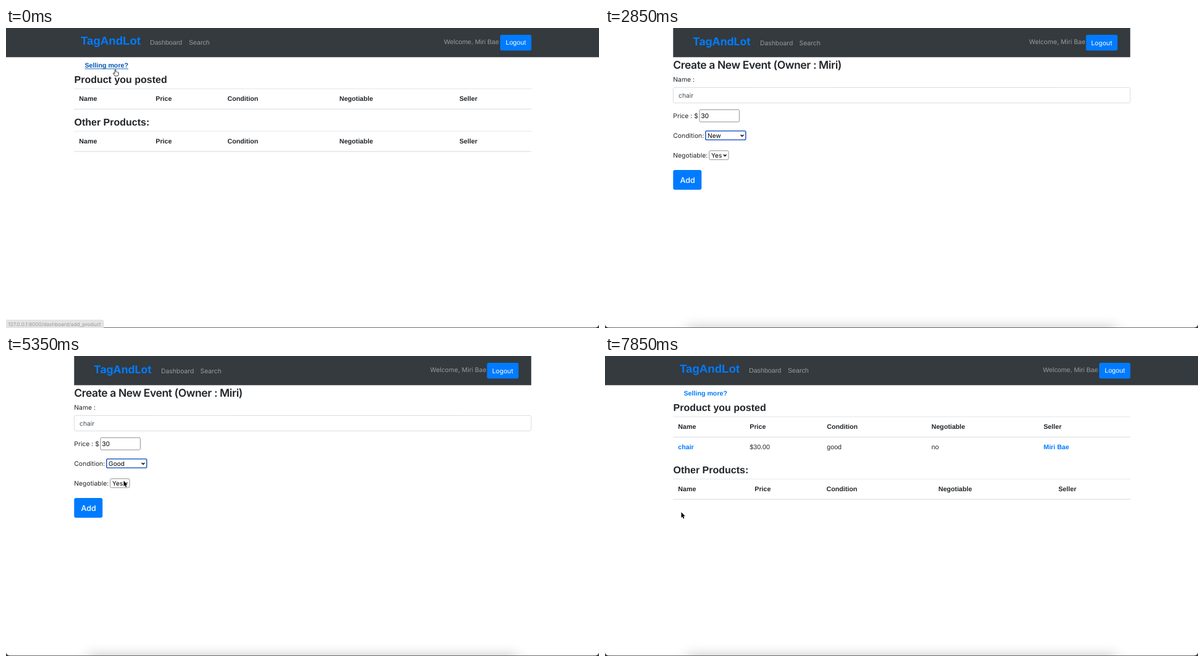
An HTML page with a canvas for the animation above (8 s loop, 960 by 486 pixels).

```html
<!DOCTYPE html>
<html lang="en">
<head>
<meta charset="utf-8">
<title>Marketplace demo</title>
<style>
  html, body { margin: 0; height: 100%; overflow: hidden; background: #fff; }
  canvas { display: block; }
</style>
</head>
<body>
<canvas id="stage" width="960" height="486"></canvas>
<script>
const ctx = document.getElementById('stage').getContext('2d');
const LOOP = 8000;
const HELV = '"Liberation Sans", Arial, sans-serif';
const INTER = 'Inter, sans-serif';
const BRAND = 'TagAndLot', FIRST = 'Miri', FULL = 'Miri Bae';
const BLUE = '#007bff', INK = '#212529', MUTED = '#999c9f', DARK = '#343a3e';
const ROWS = ['Test', 'Chair', 'Test2', 'chair', 'test3', 'test4'];

// time, x, y of the pointer's hot spot
const PATH = [
  [50, 177, 67], [500, 191.5, 110.5], [3450, 191.5, 110.5], [3800, 209, 174],
  [4250, 210, 176], [4400, 213.6, 198], [4600, 214, 201], [4900, 208, 209],
  [5100, 207, 210], [5350, 190.5, 202], [5800, 190.5, 203], [6050, 187.3, 222.5],
  [6400, 187.3, 222.5], [6900, 130, 250], [7350, 130, 250], [7550, 123.5, 253],
];

const ramp = (t, from, to) => Math.min(1, Math.max(0, (t - from) / (to - from)));

function pointerAt(t) {
  let i = 1;
  while (i < PATH.length - 1 && t > PATH[i][0]) i++;
  const [t0, x0, y0] = PATH[i - 1], [t1, x1, y1] = PATH[i];
  const k = ramp(t, t0, t1), e = k * k * (3 - 2 * k);
  return [x0 + (x1 - x0) * e, y0 + (y1 - y0) * e];
}

function text(str, x, y, size, { family = INTER, weight = 400, color = INK, spacing = 0 } = {}) {
  ctx.font = `${weight} ${size}px ${family}`;
  ctx.letterSpacing = spacing + 'px';
  ctx.fillStyle = color;
  ctx.fillText(str, x, y);
}

function rect(x, y, w, h, color) {
  ctx.fillStyle = color;
  ctx.fillRect(x, y, w, h);
}

function box(x, y, w, h, radius, fill, stroke, line = 1) {
  ctx.beginPath();
  ctx.roundRect(x, y, w, h, radius);
  if (fill) { ctx.fillStyle = fill; ctx.fill(); }
  if (stroke) { ctx.strokeStyle = stroke; ctx.lineWidth = line; ctx.stroke(); }
}

function withShadow(color, blur, dy, draw) {
  ctx.save();
  Object.assign(ctx, { shadowColor: color, shadowBlur: blur, shadowOffsetY: dy });
  draw();
  ctx.restore();
}

function polyline(points, color, width) {
  ctx.beginPath();
  points.forEach(([x, y]) => ctx.lineTo(x, y));
  ctx.strokeStyle = color;
  ctx.lineWidth = width;
  ctx.stroke();
}

function windowFrame(dockShadow) {
  rect(0, 0, 960, 486, '#3a3a3c');
  box(0, -10, 960, 495.2, 6, '#fff');
  if (!dockShadow) return;
  ctx.save();
  ctx.clip();
  withShadow('rgba(0,0,0,.28)', 22, 0, () => rect(132, 487, 696, 20, '#000'));
  ctx.restore();
}

function tableHead(y, columns) {
  rect(110, y, 740.5, 0.8, '#dee2e6');
  rect(110, y + 32.6, 740.5, 1.3, '#dee2e6');
  ['Name', 'Price', 'Condition', 'Negotiable', 'Seller'].forEach((label, i) =>
    text(label, columns[i], y + 20, 10.67, { family: HELV, weight: 700 }));
}

function dashboard(t) {
  const posted = t > 4000;
  const say = (str, x, y, color, weight, size = 10.67) =>
    text(str, x, y, size, { family: HELV, weight, color });
  windowFrame(posted);
  rect(0, 0, 960, 47.3, DARK);
  say(BRAND, 121, 27, BLUE, 700, 18.67);
  say('Dashboard', 233, 27, MUTED);
  say('Search', 296, 27, MUTED);
  say('Welcome, ' + FULL, 709, 26.3, MUTED);
  box(800, 11, 50.5, 25.5, 2.5, BLUE);
  say('Logout', 809, 27.2, '#fff');

  const linkColor = posted ? BLUE : '#0056b3';
  say('Selling more?', 127.5, 64.3, linkColor, 700);
  if (!posted) rect(127.5, 65.6, 70.5, 0.9, linkColor);
  say('Product you posted', 110.5, 89, INK, 700, 16);

  const wide = [118.3, 242.3, 358.5, 539.7, 734];
  const filled = [118.3, 234.3, 359.3, 528.5, 710];
  tableHead(98.2, posted ? filled : wide);
  if (posted) {
    ['chair', '$30.00', 'good', 'no', FULL].forEach((value, i) => {
      const link = i === 0 || i === 4;
      say(value, filled[i], 151.4, link ? BLUE : INK, link ? 700 : 400);
    });
  }
  const shift = posted ? 32 : 0;
  say('Other Products:', 110.5, 157.5 + shift, INK, 700, 16);
  tableHead(166.8 + shift, wide);

  if (!posted) {
    box(-4, 473, 162, 16, 3, '#e4e4e4', '#d6d6d6', 0.6);
    text('127.0.0.1:8000/dashboard/add_product', 3.5, 483, 8.2, { color: '#999' });
  }
}

function select(value, x, y, w, focused) {
  box(x, y, w, 14.5, 2, '#fff', focused ? '#2a62c4' : '#767676', focused ? 1.6 : 0.8);
  text(value, x + 3.3, y + 11, 10.1, { color: '#000' });
  const cx = x + w - 5.8, cy = y + 6.2;
  polyline([[cx - 2.3, cy], [cx, cy + 2.5], [cx + 2.3, cy]], '#000', 1.5);
}

function popup(x, y, w, h, options, active, alpha) {
  ctx.save();
  ctx.globalAlpha = alpha;
  withShadow('rgba(0,0,0,.22)', 9, 2, () => box(x, y, w, h, 4.5, '#eae2e4', '#d9d2d3', 0.5));
  box(x + 3.5, y + 2.8 + active * 17.5, w - 7, 17.8, 3, '#539dfa');
  options.forEach((label, i) =>
    text(label, x + 16.2, y + 15.5 + i * 17.5, 10.2, { color: i === active ? '#fff' : '#1d1d1f' }));
  polyline([[x + 7, y + 12.5], [x + 8.8, y + 15], [x + 12.4, y + 8.8]], active ? '#1d1d1f' : '#fff', 1.2);
  ctx.restore();
}

function suggestions(rows) {
  const h = rows.length * 24 + 10.5;
  withShadow('rgba(0,0,0,.24)', 3, 1, () => box(110.2, 122.3, 128.2, h, 2.5, '#fff'));
  rows.forEach((row, i) => text(row, 118.3, 143 + i * 24, 8.6, { weight: 600, color: '#333' }));
}

function form(t) {
  windowFrame(true);
  rect(110.3, 0, 740, 47.3, DARK);
  text(BRAND, 142, 28, 17.5, { weight: 700, color: BLUE });
  text('Dashboard', 251, 27.7, 10.35, { color: MUTED });
  text('Search', 314.5, 27.7, 10.35, { color: MUTED });
  text('Welcome, ' + FULL, 686.5, 26.4, 10.35, { color: MUTED });
  box(778.7, 11, 51, 25.5, 2.5, BLUE);
  text('Logout', 787, 27.6, 10.35, { color: '#fff' });
  text(`Create a New Event (Owner : ${FIRST})`, 110.3, 65.6, 17.5, { weight: 600, spacing: -0.4 });

  // Name
  text('Name :', 110.3, 87, 10.35);
  const glow = ramp(t, 600, 800) - ramp(t, 1750, 1900);
  if (glow > 0) box(109.4, 95.4, 741.6, 27, 3.5, null, `rgba(0,123,255,${0.25 * glow})`, 2.2);
  box(110.4, 96.4, 739.8, 25, 2.5, '#fff', '#ced4da', 0.8);
  if (glow > 0) box(110.4, 96.4, 739.8, 25, 2.5, null, `rgba(128,189,255,${glow})`, 0.8);
  const typed = t < 1050 ? 0 : t < 1550 ? Math.min(4, 1 + Math.floor((t - 1050) / 100)) : 5;
  text('chair'.slice(0, typed), 119, 112.7, 10.35, { color: '#495057' });
  if (t >= 600 && t < 1600)
    rect(119 + ctx.measureText('chair'.slice(0, typed)).width, 103, 0.8, 12, '#555');

  // Price
  text('Price : $', 110.3, 146, 10.35);
  const pricing = t >= 1600 && t < 2750;
  box(153, 132.3, 64.4, 19.8, 2, '#fff', pricing ? '#2a62c4' : '#767676', pricing ? 1.6 : 0.8);
  const price = t < 2500 ? '' : t < 2550 ? '3' : '30';
  text(price, 155.2, 146.2, 10.4, { color: '#000' });
  if (pricing && (t < 2250 || t >= 2500))
    rect(155.4 + ctx.measureText(price).width, 136.5, 0.8, 12, '#000');

  // Selects
  const y = pointerAt(t)[1];
  text('Condition:', 110.3, 178, 10.35);
  select(t < 5050 ? 'New' : 'Good', 162.8, 166.8, 65, t >= 2750 && t < 5550);
  text('Negotiable:', 110.3, 210, 10.35);
  select(t < 6450 ? 'Yes' : 'No', 168.7, 198.8, 31.3, false);
  box(110.3, 230, 46, 32, 3.2, BLUE);
  text('Add', 121.5, 250.5, 12.6, { weight: 500, color: '#fff' });

  if (t >= 3850 && t < 5250)
    popup(157, 163.5, 78, 58.5, ['New', 'Very Good', 'Good'], y < 184 ? 0 : y < 201.5 ? 1 : 2, 1 - ramp(t, 5050, 5250));
  if (t >= 5550 && t < 6500)
    popup(163, 195.3, 44, 41.5, ['Yes', 'No'], y < 215 ? 0 : 1, 1 - ramp(t, 6340, 6500) * 0.8);
  if (t >= 600 && t < 1600) suggestions(t < 1050 ? ROWS : ['Chair', 'chair']);
}

const ARROW = new Path2D('M0 0 L0 9 L2 7.2 L3.4 10.4 L4.9 9.7 L3.5 6.6 L6.3 6.4 Z');
const HAND = new Path2D('M-.9 1 Q0 -.6 .9 1 L1 4 Q2 3.2 2.6 4.4 Q3.6 3.7 4.1 4.9 Q5.2 4.4 5.4 5.8 L5 8.6 L4 10.8 L-.8 10.8 L-3.2 7.2 Q-4 5.6 -2.5 5.8 L-.9 7 Z');

function pointer(t) {
  if (t >= 1050 && t < 3450) return;
  const [x, y] = pointerAt(t);
  const onInput = t >= 200 && t < 3800 && y > 97 && y < 121;
  const onLink = t < 200 || (t >= 6800 && t < 7450);
  ctx.save();
  ctx.translate(x, y);
  ctx.lineJoin = 'round';
  if (onInput) {
    polyline([[-2, -5], [-0.3, -4.4], [0, -4], [0, 4], [-0.3, 4.4], [-2, 5]], '#222', 0.9);
    polyline([[2, -5], [0.3, -4.4], [0, -4], [0, 4], [0.3, 4.4], [2, 5]], '#222', 0.9);
    polyline([[-1.3, 1.5], [1.3, 1.5]], '#222', 0.8);
  } else if (onLink) {
    ctx.fillStyle = '#fff';
    ctx.strokeStyle = '#222';
    ctx.lineWidth = 0.9;
    ctx.fill(HAND);
    ctx.stroke(HAND);
  } else {
    ctx.strokeStyle = '#fff';
    ctx.lineWidth = 1.4;
    ctx.fillStyle = '#000';
    ctx.stroke(ARROW);
    ctx.fill(ARROW);
  }
  ctx.restore();
}

function frame(now) {
  const t = now % LOOP;
  ctx.textRendering = 'geometricPrecision';
  (t < 150 || t >= 7150 ? dashboard : form)(t);
  pointer(t);
  requestAnimationFrame(frame);
}
requestAnimationFrame(frame);
</script>
</body>
</html>
```
